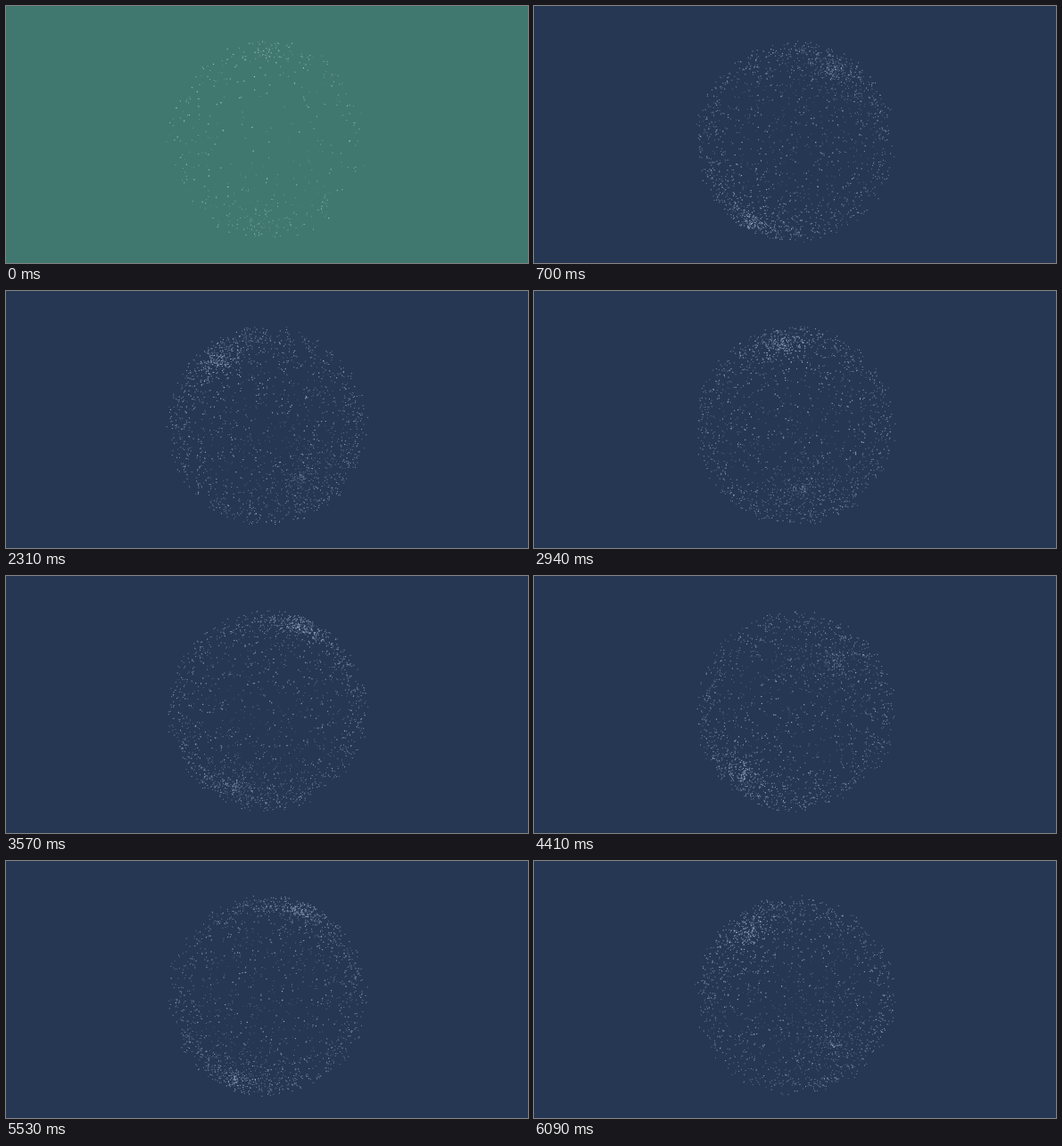
An HTML page with a canvas for the animation above (6.16 s loop, 585x289 px).

```html
<!DOCTYPE html>
<html>
<head>
<meta charset="utf-8">
<style>
html, body { margin: 0; width: 100%; height: 100%; overflow: hidden; background: #263753; }
canvas { display: block; }
</style>
</head>
<body>
<canvas id="stage" width="585" height="289"></canvas>
<script>
const ctx = document.getElementById('stage').getContext('2d');
const LOOP = 6160, STEP = 70, FADE = 420;
const CX = 293, CY = 152, RADIUS = 107, DEPTH = 490, COUNT = 2000;
const TEAL = [64, 120, 112], NAVY = [38, 55, 83];

// Direction of the upper pole over time: ms, x, y (up), z (to the viewer)
const poses = [
  [0, .02, .9, .4],
  [700, .42, .79, -.33],
  [2310, -.43, .63, .66],
  [3570, .37, .86, .31],
  [4410, .48, .59, -.65],
  [5530, .36, .92, .12],
  [6090, -.45, .6, .67]
];

let seed = 7;
const random = () => {
  seed = (seed * 1664525 + 1013904223) % 4294967296;
  return seed / 4294967296;
};

// Even polar angles crowd the dots at both poles
const dots = Array.from({ length: COUNT }, () => ({
  polar: random() * Math.PI,
  turn: random() * 2 * Math.PI,
  r: RADIUS * (.9 + random() * .135),
  light: .35 + random() * .45,
  rank: random(),
  pink: random() < .25
}));

const mix = (a, b, k) => a + (b - a) * k;
const unit = v => {
  const n = Math.hypot(...v);
  return v.map(c => c / n);
};
const cross = (a, b) => [
  a[1] * b[2] - a[2] * b[1],
  a[2] * b[0] - a[0] * b[2],
  a[0] * b[1] - a[1] * b[0]
];

function slope(i, c) {
  const a = poses[Math.max(i - 1, 0)], b = poses[Math.min(i + 1, poses.length - 1)];
  return (b[c] - a[c]) / (b[0] - a[0]);
}

// Smooth cubic path through the poses
function poleAt(t) {
  let i = 0;
  while (i < poses.length - 2 && t >= poses[i + 1][0]) i++;
  const a = poses[i], b = poses[i + 1], span = b[0] - a[0];
  const k = (t - a[0]) / span, k2 = k * k, k3 = k2 * k;
  return unit([1, 2, 3].map(c =>
    (2 * k3 - 3 * k2 + 1) * a[c] + (3 * k2 - 2 * k3) * b[c] +
    span * ((k3 - 2 * k2 + k) * slope(i, c) + (k3 - k2) * slope(i + 1, c))));
}

function draw(t) {
  const fade = Math.min(t / FADE, 1);
  ctx.globalAlpha = 1;
  ctx.fillStyle = `rgb(${TEAL.map((c, i) => Math.round(mix(c, NAVY[i], fade)))})`;
  ctx.fillRect(0, 0, 585, 289);

  const pole = poleAt(t);
  const u = unit(cross(pole, [0, 0, 1])), v = cross(pole, u);
  const spin = t * .0006;
  for (const d of dots) {
    if (d.rank > mix(.25, 1, fade)) continue;
    const s = Math.sin(d.polar), h = Math.cos(d.polar);
    const p = s * Math.cos(d.turn + spin), q = s * Math.sin(d.turn + spin);
    const [x, y, z] = pole.map((c, i) => d.r * (c * h + u[i] * p + v[i] * q));
    const scale = DEPTH / (DEPTH - z);
    const near = (z / RADIUS + 1) / 2;
    const size = .95 * scale;
    ctx.globalAlpha = d.light * mix(.7, .95, near);
    ctx.fillStyle = fade > .5 ? '#c3d6ee' : d.pink ? '#b48ca4' : '#e6f2f4';
    ctx.fillRect(CX + x * scale - size / 2, CY - y * scale - size / 2, size, size);
  }
}

function frame() {
  const t = performance.now() % LOOP;
  draw(Math.floor(t / STEP) * STEP);
  requestAnimationFrame(frame);
}
frame();
</script>
</body>
</html>
```
